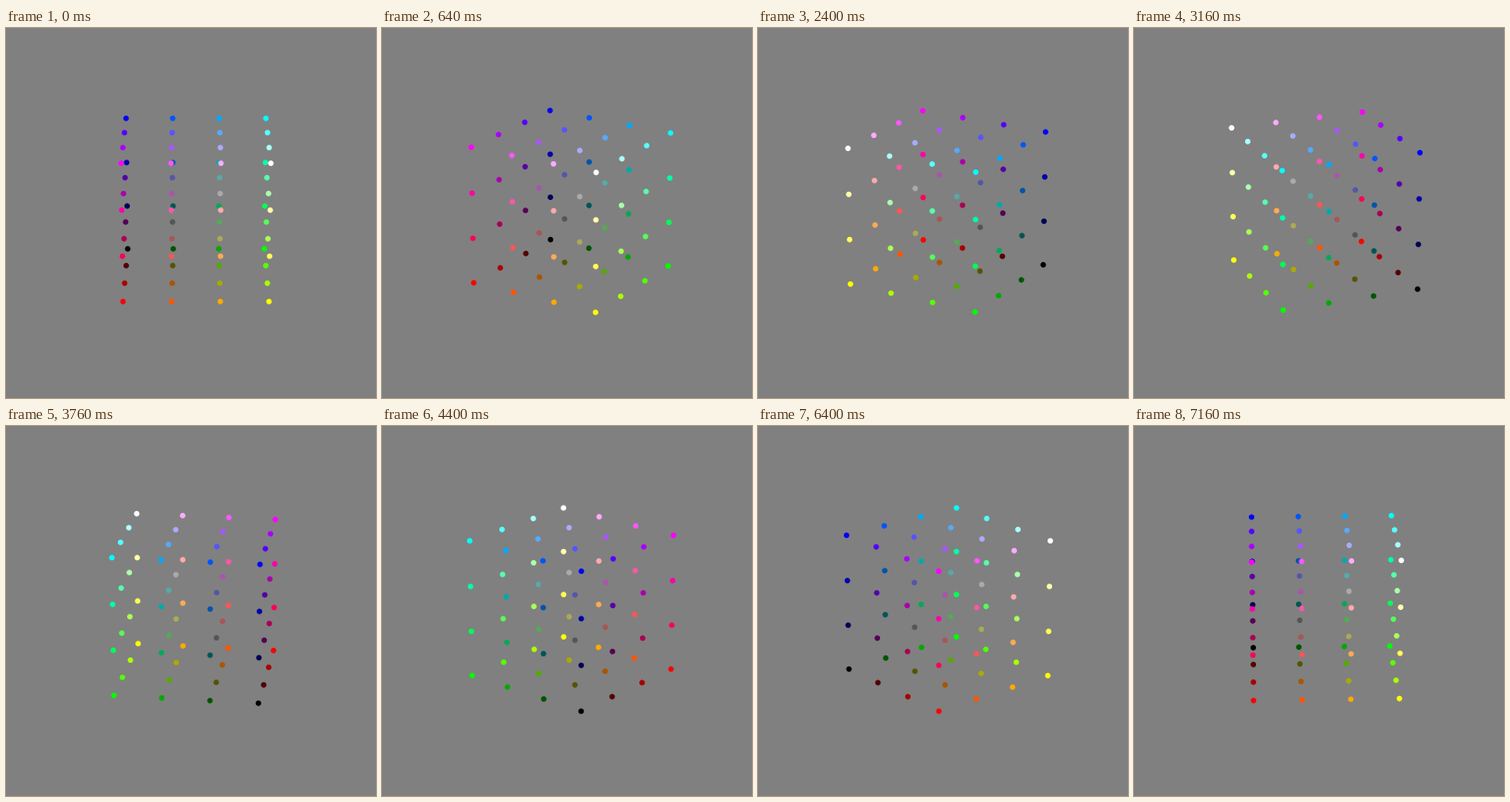
Write a matplotlib script that moves like this. It is 400x400 px and loops after 7.2 s.

```python
import itertools

import matplotlib.pyplot as plt
import numpy as np
from matplotlib.animation import FuncAnimation

SIZE = 400
FRAMES = 180
ELEV = np.radians(20)
DIST = 14.0                      # camera distance in cube edges
FOCAL = SIZE / 0.185             # pixels per unit at distance one
ORIGIN = SIZE * 0.095 / 0.185    # optical centre from left and bottom
DOT = 5.97                       # dot diameter in pixels

levels = np.linspace(0, 1, 4)
colors = np.array(list(itertools.product(levels, repeat=3)))
x, y, z = (colors - 0.5).T


def project(azim):
    """Return screen positions and closeness to the camera."""
    toward = x * np.cos(azim) + y * np.sin(azim)
    u = y * np.cos(azim) - x * np.sin(azim)
    v = z * np.cos(ELEV) - toward * np.sin(ELEV)
    near = toward * np.cos(ELEV) + z * np.sin(ELEV)
    scale = FOCAL / (DIST - near)
    return ORIGIN + np.column_stack([u * scale, v * scale]), near


fig = plt.figure(figsize=(SIZE / 100, SIZE / 100), dpi=100, facecolor="#808080")
ax = fig.add_axes([0, 0, 1, 1])
ax.set_xlim(0, SIZE)
ax.set_ylim(0, SIZE)
ax.axis("off")
dots = ax.scatter(x, y, s=(DOT * 0.72) ** 2, c=colors, linewidths=0)


def update(frame):
    pos, near = project(2 * np.pi * frame / FRAMES)
    order = np.argsort(near, kind="stable")
    dots.set_offsets(pos[order])
    dots.set_facecolor(colors[order])
    return (dots,)


anim = FuncAnimation(fig, update, frames=FRAMES, interval=40,
                     repeat=True, repeat_delay=0)
plt.show()
```
